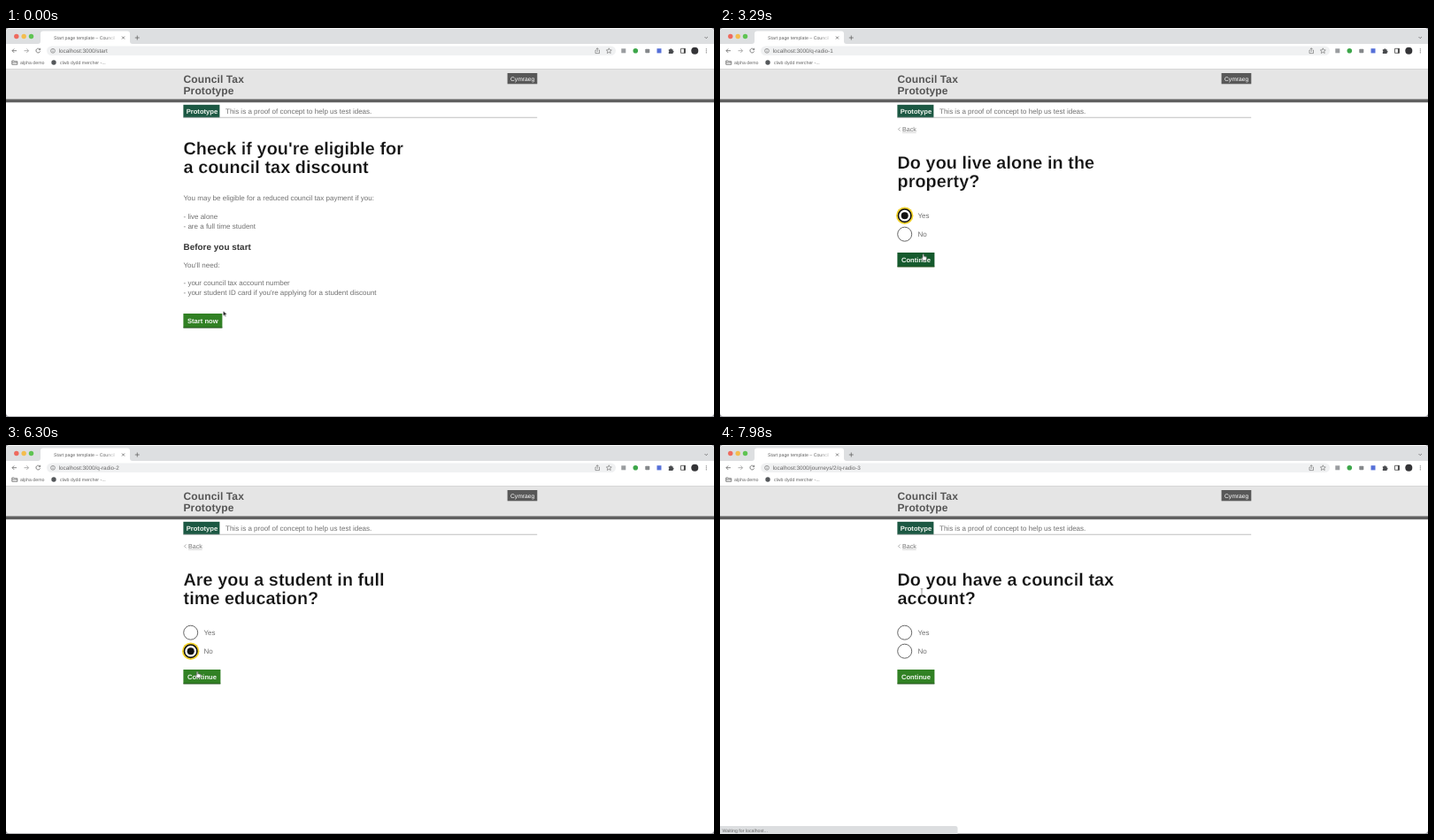
Write an HTML page that moves like this. It is 800 px wide and 440 px high and loops after 8 s.

```html
<!DOCTYPE html>
<html lang="en">
<head>
<meta charset="utf-8">
<title>Council tax prototype</title>
<style>
  html, body { margin: 0; width: 100%; height: 100%; overflow: hidden; background: #fff; }
  svg { display: block; width: 800px; height: 440px; }
  text { font: 8.03px "Liberation Sans", Arial, sans-serif; fill: #707070; text-rendering: geometricPrecision; white-space: pre; }
  .ui { font-size: 5.25px; fill: #666; }
  .url { font-size: 6.35px; fill: #666; }
  .brand { font-size: 12px; font-weight: bold; fill: #565656; letter-spacing: .12px; }
  .h1 { font-size: 19.8px; font-weight: bold; fill: #111; stroke: #fff; stroke-width: .25px; letter-spacing: .07px; }
  .h2 { font-size: 9.9px; font-weight: bold; fill: #333; letter-spacing: .04px; }
  .label { font-size: 7.6px; font-weight: bold; fill: #f2f7f1; }
  .back { font-size: 7.1px; }
  .line { fill: none; stroke: #666; stroke-width: .8; }
  .btn { fill: #318124; }
  .edge { fill: #22511c; }
  .ring { fill: #fff; stroke: #666; }

  .step { animation: 8s step-end infinite; }
  #start { animation-name: start; }
  #alone { animation-name: alone; }
  #student { animation-name: student; }
  #result { animation-name: result; }
  #account { animation-name: account; }
  @keyframes start { 0% { opacity: 1 } 15.75%, 100% { opacity: 0 } }
  @keyframes alone { 0% { opacity: 0 } 15.75% { opacity: 1 } 43.75%, 100% { opacity: 0 } }
  @keyframes student { 0% { opacity: 0 } 43.75% { opacity: 1 } 84%, 100% { opacity: 0 } }
  @keyframes result { 0% { opacity: 0 } 84% { opacity: 1 } 98%, 100% { opacity: 0 } }
  @keyframes account { 0% { opacity: 0 } 98%, 100% { opacity: 1 } }

  #pickYes { animation-name: pickYes; }
  #pickNo { animation-name: pickNo; }
  @keyframes pickYes { 0% { opacity: 0 } 33.25%, 100% { opacity: 1 } }
  @keyframes pickNo { 0% { opacity: 0 } 65.6%, 100% { opacity: 1 } }

  #hotStart { animation-name: hotStart; }
  #hotAlone { animation-name: hotAlone; }
  #hotStudent { animation-name: hotStudent; }
  #hotApply { animation-name: hotApply; }
  @keyframes hotStart { 0% { fill: #318124 } 5.25%, 100% { fill: #155a2d } }
  @keyframes hotAlone { 0% { fill: #318124 } 38.5%, 100% { fill: #155a2d } }
  @keyframes hotStudent { 0% { fill: #155a2d } 50.75% { fill: #318124 } 79.6%, 100% { fill: #155a2d } }
  @keyframes hotApply { 0% { fill: #318124 } 93.1%, 100% { fill: #155a2d } }

  #status { animation-name: status; }
  #wait { animation-name: wait; }
  #linkStart { animation-name: linkStart; }
  #linkApply { animation-name: linkApply; }
  @keyframes status {
    0% { opacity: 0 } 5.25% { opacity: 1 } 19.25% { opacity: 0 }
    42% { opacity: 1 } 48.1% { opacity: 0 }
    83.1% { opacity: 1 } 88.1% { opacity: 0 } 93.1%, 100% { opacity: 1 }
  }
  @keyframes wait { 0% { opacity: 0 } 14.8% { opacity: 1 } 93.1% { opacity: 0 } 98%, 100% { opacity: 1 } }
  @keyframes linkStart { 0% { opacity: 1 } 14.8%, 100% { opacity: 0 } }
  @keyframes linkApply { 0% { opacity: 0 } 93.1% { opacity: 1 } 98%, 100% { opacity: 0 } }

  #pointer { animation: move 8s ease-in-out infinite; }
  @keyframes move {
    0%, .8% { transform: translate(245.5px, 320px) }
    6.3% { transform: translate(236px, 331px) }
    18%, 21.8% { transform: translate(237px, 333px) }
    27.1%, 28.8% { transform: translate(224.5px, 236.5px) }
    32%, 34.5% { transform: translate(222px, 212px) }
    39.4%, 49.8% { transform: translate(229px, 255.5px) }
    58%, 70.8% { transform: translate(220.5px, 236px) }
    76%, 87.4% { transform: translate(215.5px, 256px) }
    91% { transform: translate(228px, 187px) }
    94.5%, 100% { transform: translate(228px, 166px) }
  }
  #arrow { animation-name: arrow; }
  #hand { animation-name: hand; }
  #beam { animation-name: account; }
  @keyframes arrow {
    0% { opacity: 1 } 5.25% { opacity: 0 } 15.75% { opacity: 1 } 26.3% { opacity: 0 }
    84% { opacity: 1 } 93.1%, 100% { opacity: 0 }
  }
  @keyframes hand {
    0% { opacity: 0 } 5.25% { opacity: 1 } 15.75% { opacity: 0 } 26.3% { opacity: 1 }
    84% { opacity: 0 } 93.1% { opacity: 1 } 98%, 100% { opacity: 0 }
  }
</style>
</head>
<body>
<svg viewBox="0 0 800 440" width="800" height="440">
  <defs>
    <g id="back">
      <path class="line" d="M203.500 112.500l-2 2 2 2" style="stroke-width:.5"/>
      <text class="back" x="206" y="117">Back</text>
      <rect x="206" y="117.900" width="15.700" height=".5" fill="#aaa"/>
    </g>
    <g id="radios">
      <circle class="ring" cx="208.700" cy="212.200" r="8"/>
      <circle class="ring" cx="208.700" cy="233.200" r="8"/>
      <text x="223.500" y="215.200">Yes</text>
      <text x="223.500" y="236.200">No</text>
    </g>
    <g id="picked">
      <circle r="9.700" fill="#f3d32b"/>
      <circle r="7.200" fill="#fff" stroke="#111" stroke-width="1.600"/>
      <circle r="4" fill="#111"/>
    </g>
    <linearGradient id="fade" gradientUnits="userSpaceOnUse" x1="112" x2="127">
      <stop stop-color="#fff" stop-opacity="0"/><stop offset="1" stop-color="#fff"/>
    </linearGradient>
  </defs>

  <!-- Window -->
  <rect width="800" height="440" fill="#9a9aa0"/>
  <rect width="800" height="439.300" rx="4" fill="#fff"/>
  <path d="M0 18V4.500Q0 .7 4 .7H796Q800 .7 800 4.500V18Z" fill="#dddfe1"/>
  <path d="M36 18q3 0 3-3V6.500q0-3 3-3H137q3 0 3 3V15q0 3 3 3Z" fill="#fff"/>
  <circle cx="11.800" cy="9.500" r="2.700" fill="#ee6a5e"/>
  <circle cx="20.200" cy="9.500" r="2.700" fill="#f4bd4e"/>
  <circle cx="28.500" cy="9.500" r="2.700" fill="#5fc453"/>
  <text class="ui" x="54" y="12.800">Start page template – Council</text>
  <rect x="112" y="6" width="15" height="9" fill="url(#fade)"/>
  <path class="line" d="M131 9.500l3 3m0-3l-3 3M145.800 11h5m-2.500-2.500v5M789.500 10l1.700 1.700 1.700-1.700"/>

  <!-- Toolbar -->
  <rect x="46" y="20.500" width="643" height="10.500" rx="5.250" fill="#f0f1f2"/>
  <g class="line">
    <path d="M12 25.700H7m2.200-2.200L7 25.700l2.200 2.200"/>
    <path d="M20.500 25.700h5m-2.200-2.200l2.200 2.200-2.200 2.200" stroke="#999"/>
    <path d="M38.300 24.200a2.400 2.400 0 1 0 .3 2.200M38.700 22.800v1.900h-1.900"/>
    <circle cx="53" cy="25.800" r="2.400" stroke-width=".6"/>
    <path d="M53 25.500v1.700m0-2.900v.6" stroke-width=".6"/>
    <path d="M666.800 25H666v3.600h4.500V25h-.8M668.200 27v-4.200m-1.300 1.200l1.300-1.300 1.300 1.300" stroke-width=".6"/>
    <path d="M681.300 22.800l.9 2 2.100.2-1.600 1.400.5 2.100-1.900-1.100-1.900 1.100.5-2.100-1.600-1.400 2.100-.2Z" stroke-width=".6"/>
    <path d="M762.500 23.300h5v5h-5zM766.400 23.300v5" stroke="#444"/>
    <path d="M766 23.300h1.500v5H766z" fill="#444" stroke="none"/>
  </g>
  <rect x="695.300" y="23.300" width="5" height="5" fill="#9a9da0"/>
  <circle cx="711.300" cy="25.800" r="2.800" fill="#3da64a"/>
  <rect x="722.300" y="23.700" width="5" height="4.500" rx=".8" fill="#85888b"/>
  <rect x="735.500" y="23.200" width="5" height="5.200" fill="#5670d8"/>
  <path d="M748.800 24.300h1.500a1 1 0 0 1 2 0h1.300v1.500a1 1 0 0 1 0 2v1.100h-4.800v-1.600a.9.900 0 0 0 0-1.600Z" fill="#484a4d"/>
  <circle cx="778.300" cy="25.800" r="4" fill="#343437"/>
  <g fill="#666"><circle cx="791.300" cy="23.800" r=".6"/><circle cx="791.300" cy="25.800" r=".6"/><circle cx="791.300" cy="27.800" r=".6"/></g>

  <!-- Bookmarks -->
  <path class="line" d="M6.800 37h2.300l.7.800h3v3.500h-6zM6.800 39h6"/>
  <text class="ui" x="16" y="40.800">alpha demo</text>
  <circle cx="54" cy="39" r="2.700" fill="#55585b"/>
  <text class="ui" x="61" y="40.800">clwb dydd mercher -...</text>

  <!-- Site header -->
  <rect y="46" width="800" height="35" fill="#e5e5e5"/>
  <rect y="46" width="800" height=".7" fill="#d2d2d2"/>
  <rect y="80.500" width="800" height="3.700" fill="#606060"/>
  <text class="brand" x="200.500" y="62">Council Tax</text>
  <text class="brand" x="200.500" y="74.500">Prototype</text>
  <rect x="566.600" y="51" width="33.700" height="12.300" fill="#585858"/>
  <text x="570" y="59.600" style="font-size:6.700px;fill:#fff">Cymraeg</text>
  <rect x="200.400" y="86.800" width="41" height="14.500" fill="#1c5843"/>
  <text class="label" x="203.700" y="97">Prototype</text>
  <text x="248" y="97">This is a proof of concept to help us test ideas.</text>
  <rect x="200.400" y="100.800" width="399.800" height=".8" fill="#b0b0b0"/>

  <!-- Pages -->
  <g id="start" class="step">
    <text class="url" x="59.700" y="28">localhost:3000/start</text>
    <text class="h1" x="200.500" y="142.800">Check if you're eligible for</text>
    <text class="h1" x="200.500" y="163.800">a council tax discount</text>
    <text x="200.500" y="195.200">You may be eligible for a reduced council tax payment if you:</text>
    <text x="200.500" y="216.200">- live alone</text>
    <text x="200.500" y="226.700">- are a full time student</text>
    <text class="h2" x="200.500" y="251.200">Before you start</text>
    <text x="200.500" y="270.500">You'll need:</text>
    <text x="200.500" y="291.300">- your council tax account number</text>
    <text x="200.500" y="301.800">- your student ID card if you're applying for a student discount</text>
    <rect id="hotStart" class="btn step" x="200.400" y="323" width="44" height="16"/>
    <rect class="edge" x="200.400" y="338.500" width="44" height="1"/>
    <text class="label" x="205" y="333.800">Start now</text>
  </g>

  <g id="alone" class="step">
    <text class="url" x="59.700" y="28">localhost:3000/q-radio-1</text>
    <use href="#back"/>
    <text class="h1" x="200.500" y="159.300">Do you live alone in the</text>
    <text class="h1" x="200.500" y="180.300">property?</text>
    <use href="#radios"/>
    <g id="pickYes" class="step"><use href="#picked" x="208.700" y="212.200"/></g>
    <rect id="hotAlone" class="btn step" x="200.400" y="254" width="42" height="16"/>
    <rect class="edge" x="200.400" y="269.500" width="42" height="1"/>
    <text class="label" x="205" y="265">Continue</text>
  </g>

  <g id="student" class="step">
    <text class="url" x="59.700" y="28">localhost:3000/q-radio-2</text>
    <use href="#back"/>
    <text class="h1" x="200.500" y="159.300">Are you a student in full</text>
    <text class="h1" x="200.500" y="180.300">time education?</text>
    <use href="#radios"/>
    <g id="pickNo" class="step"><use href="#picked" x="208.700" y="233.200"/></g>
    <rect id="hotStudent" class="btn step" x="200.400" y="254" width="42" height="16"/>
    <rect class="edge" x="200.400" y="269.500" width="42" height="1"/>
    <text class="label" x="205" y="265">Continue</text>
  </g>

  <g id="result" class="step">
    <text class="url" x="59.700" y="28">localhost:3000/journeys/2/confirmation-1</text>
    <use href="#back"/>
    <text x="200.500" y="149.500">Based on the information you've provided, you could qualify for a discount on your council tax payments.</text>
    <rect id="hotApply" class="btn step" x="200.400" y="160.500" width="47.400" height="16"/>
    <rect class="edge" x="200.400" y="175.900" width="47.400" height="1"/>
    <text class="label" x="205" y="171.300">Apply now</text>
  </g>

  <g id="account" class="step">
    <text class="url" x="59.700" y="28">localhost:3000/journeys/2/q-radio-3</text>
    <use href="#back"/>
    <text class="h1" x="200.500" y="159.300">Do you have a council tax</text>
    <text class="h1" x="200.500" y="180.300">account?</text>
    <use href="#radios"/>
    <rect class="btn" x="200.400" y="254" width="42" height="16"/>
    <rect class="edge" x="200.400" y="269.500" width="42" height="1"/>
    <text class="label" x="205" y="265">Continue</text>
  </g>

  <g id="status" class="step">
    <path d="M0 431H266q2.500 0 2.500 2.500V440H0Z" fill="#dcdee0"/>
    <text id="wait" class="ui step" x="2.500" y="437.800">Waiting for localhost...</text>
    <text id="linkStart" class="ui step" x="2.500" y="437.800">localhost:3000/q-radio-1</text>
    <text id="linkApply" class="ui step" x="2.500" y="437.800">localhost:3000/journeys/2/q-radio-3</text>
  </g>

  <g id="pointer">
    <path id="arrow" class="step" d="M0 0V5.600L1.300 4.500 2.100 6.400 3.100 6 2.300 4.100H4Z" fill="#111" stroke="#fff" stroke-width=".4"/>
    <path id="hand" class="step" d="M0 .6Q.8-.2 1.500.7V2.800L4 3.300Q4.800 3.500 4.700 4.400L4 7.600H.6L-1.600 4.700Q-1.400 3.700 0 4.500Z" fill="#fff" stroke="#444" stroke-width=".6"/>
    <path id="beam" class="step" d="M-1.300-3.500Q0-3.500 0-2.700 0-3.500 1.300-3.500M0-2.700V4M-1.300 4.800Q0 4.800 0 4 0 4.800 1.300 4.800" fill="none" stroke="#555" stroke-width=".6"/>
  </g>
</svg>
</body>
</html>
```
